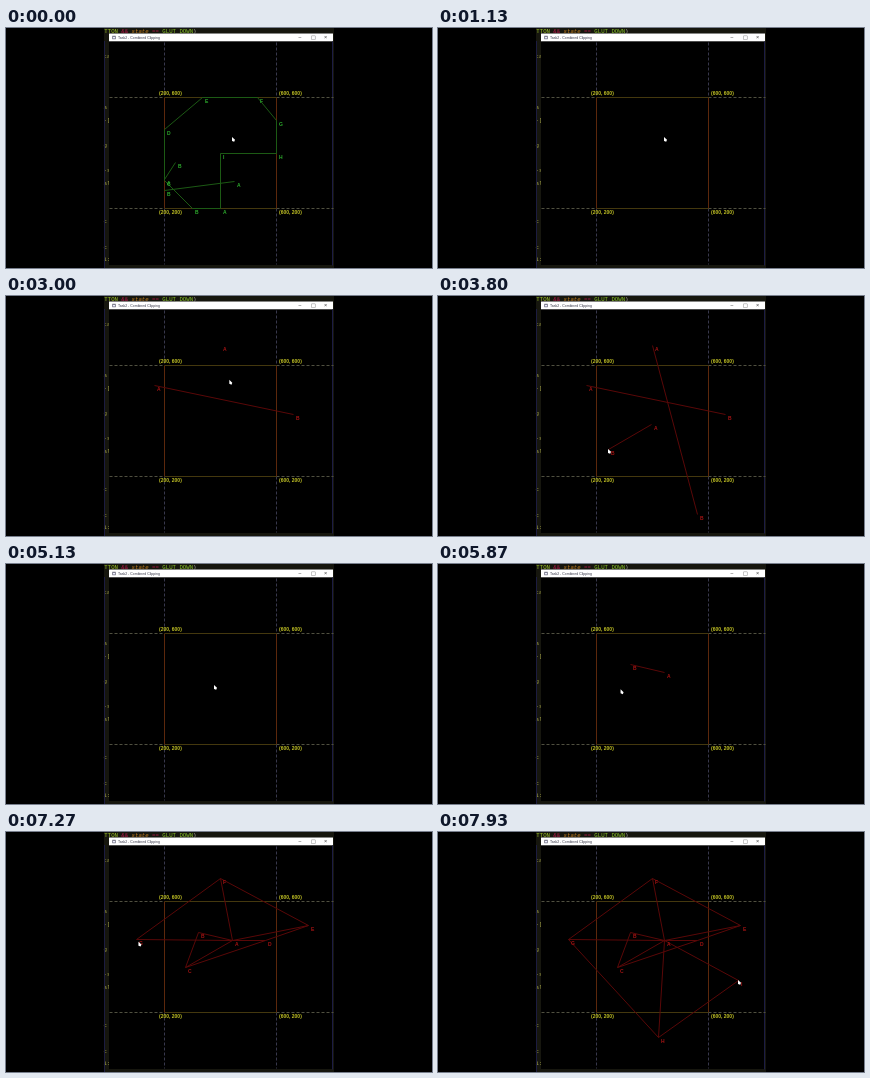
An HTML page with a canvas that plays this animation: 426x240 px, repeating every 8 s.

```html
<!DOCTYPE html>
<html lang="en">
<head>
<meta charset="utf-8">
<title>Combined clipping</title>
<style>
html, body { margin: 0; width: 100%; height: 100%; overflow: hidden; background: #000; }
canvas { display: block; width: 426px; height: 240px; }
</style>
</head>
<body>
<canvas id="stage" width="426" height="240"></canvas>
<script>
const ctx = document.getElementById('stage').getContext('2d');
const LOOP = 8000;
const SANS = '"Liberation Sans", Arial, sans-serif';
const MONO = '"Liberation Mono", monospace';
const LEFT = 158, RIGHT = 270, TOP = 69, BOTTOM = 180;
const win = { x: 103, y: 5.5, right: 327, bottom: 237, bar: 7.8 };
const red = { line: '#5a0808', text: '#a01212' };
const green = { line: '#1c5a14', text: '#2ca82c' };
const CLEAR_FIRST = 600, CLIP_LINES = 4150, CLEAR_LINES = 4700;

const clicksFrom = (start, step, points) =>
  points.map(([x, y], i) => ({ t: start + i * step, x, y }));
const toPoints = pairs => pairs.map(([x, y]) => ({ x, y }));

// Each consecutive pair of these clicks makes one line.
const lineClicks = clicksFrom(2350, 284, [
  [148, 89], [287, 118], [214, 49], [259, 218], [213, 128], [170, 153]
]);
const polygonClicks = clicksFrom(5350, 315, [
  [226, 108], [192, 100], [179, 135], [259, 108], [302, 93],
  [214, 46], [130, 107], [220, 205], [300, 148]
]);
const firstPolygon = toPoints([
  [214, BOTTOM], [186, BOTTOM], [LEFT, 152], [LEFT, 101], [196, TOP],
  [251, TOP], [RIGHT, 92], [RIGHT, 125], [214, 125]
]);
const firstLines = toPoints([[228, 153], [LEFT, 162], [LEFT, 151], [169, 134]]);
const rest = { x: 226, y: 109 }, pause = { x: 208, y: 121 };
const cursorPath = [
  { t: 0, ...rest }, { t: 1300, ...rest }, { t: 2200, x: 149, y: 78 },
  ...lineClicks, { ...lineClicks.at(-1), t: 4400 },
  { t: 4900, ...pause }, { t: 5130, ...pause },
  ...polygonClicks, { ...polygonClicks.at(-1), t: LOOP }
];

function rect(x, y, w, h, color) {
  ctx.fillStyle = color;
  ctx.fillRect(x, y, w, h);
}

function text(str, x, y, size, color, family = SANS, style = '') {
  ctx.font = `${style} ${size}px ${family}`;
  ctx.fillStyle = color;
  ctx.fillText(str, x, y);
}

function line(a, b, color, dash = []) {
  ctx.strokeStyle = color;
  ctx.lineWidth = 1;
  ctx.setLineDash(dash);
  ctx.beginPath();
  ctx.moveTo(a.x + 0.5, a.y + 0.5);
  ctx.lineTo(b.x + 0.5, b.y + 0.5);
  ctx.stroke();
}

const hLine = (y, x1, x2, color, dash) => line({ x: x1, y }, { x: x2, y }, color, dash);
const vLine = (x, y1, y2, color, dash) => line({ x, y: y1 }, { x, y: y2 }, color, dash);

function label(p, i, color) {
  text(String.fromCharCode(65 + i), p.x + 3, p.y + 5.5, 5, color, SANS, 'bold');
}

// Liang-Barsky clipping against the inner rectangle
function clip(a, b) {
  const dx = b.x - a.x, dy = b.y - a.y;
  let from = 0, to = 1;
  for (const [p, q] of [
    [-dx, a.x - LEFT], [dx, RIGHT - a.x], [-dy, a.y - TOP], [dy, BOTTOM - a.y]
  ]) {
    if (p < 0) from = Math.max(from, q / p);
    if (p > 0) to = Math.min(to, q / p);
  }
  return [from, to].map(u => ({ x: a.x + u * dx, y: a.y + u * dy }));
}

function drawEditor() {
  rect(98, 0, 230, 240, '#16160e');
  let x = 98.3;
  for (const [word, color, style] of [
    ['TTON ', '#a0c828', ''], ['&& ', '#b01848', ''], ['state ', '#c88020', 'italic'],
    ['== ', '#b01848', ''], ['GLUT_DOWN', '#88c428', ''], [')', '#b0b0a0', '']
  ]) {
    text(word, x, 4.6, 5.7, color, MONO, style);
    x += ctx.measureText(word).width;
  }
  'ta    a -[  g  -s al   c  c i:'.split(' ').length;
  'ta,,,,a,-[,,g,,-s,al,,,c,,c,i:'.split(',').forEach((word, i) =>
    text(word, 97.5, 30 + i * 12.7, 5.7, '#a8a848', MONO));
  rect(98, 13, 1, 227, '#1c1c40');
}

function drawWindow() {
  const { x, y, right, bottom, bar } = win;
  rect(x, y, right - x, bottom - y, '#000');
  rect(x, y, right - x, bar, '#fff');
  rect(106.3, 7.8, 3.4, 3.4, '#667');
  rect(107, 8.8, 2, 1.7, '#eef');
  text('Task2 - Combined Clipping', 112, 10.6, 3.5, '#334');
  text('–', 292.5, 10.8, 5, '#333');
  text('□', 305, 10.8, 5, '#333', '"DejaVu Sans", sans-serif');
  text('×', 318, 11, 5.5, '#333');
  vLine(right - 1, 13, bottom, '#1c1c44');
}

function drawGuides() {
  for (const x of [LEFT, RIGHT]) {
    vLine(x, 14, TOP, '#38384c', [3, 2]);
    vLine(x, BOTTOM, 236, '#38384c', [3, 2]);
    vLine(x, TOP, BOTTOM, '#5c280c');
  }
  for (const y of [TOP, BOTTOM]) {
    hLine(y, win.x, LEFT, '#505040', [3, 2]);
    hLine(y, RIGHT, win.right, '#505040', [3, 2]);
    hLine(y, LEFT, RIGHT, '#44380e');
    for (const x of [LEFT, RIGHT]) {
      const name = `(${x === LEFT ? 200 : 600}, ${y === TOP ? 600 : 200})`;
      text(name, x + (x === LEFT ? -5 : 3), y + (y === TOP ? -2.5 : 6.2), 5, '#c0c024', SANS, 'bold');
    }
  }
}

function drawPairs(points, colors, fit = (a, b) => [a, b]) {
  for (let i = 0; i < points.length; i += 2) {
    const [a, b] = points[i + 1] ? fit(points[i], points[i + 1]) : [points[i]];
    if (b) {
      line(a, b, colors.line);
      label(b, 1, colors.text);
    }
    label(a, 0, colors.text);
  }
}

function drawFirstResult() {
  firstPolygon.forEach((p, i) => {
    line(p, firstPolygon[(i + 1) % firstPolygon.length], green.line);
    label(p, i, green.text);
  });
  drawPairs(firstLines, green);
}

// Every new vertex adds an edge and a closing edge; older closing edges remain.
function drawPolygon(points) {
  points.forEach((p, i) => {
    if (i) line(points[i - 1], p, red.line);
    if (i > 1) line(p, points[0], red.line);
  });
  points.forEach((p, i) => label(p, i, red.text));
}

function drawCursor(t) {
  const i = cursorPath.findIndex(k => k.t > t);
  const a = cursorPath[i - 1], b = cursorPath[i];
  const u = (t - a.t) / (b.t - a.t), ease = u * u * (3 - 2 * u);
  const x = a.x + (b.x - a.x) * ease, y = a.y + (b.y - a.y) * ease;
  ctx.fillStyle = '#fff';
  ctx.beginPath();
  ctx.moveTo(x, y);
  ctx.lineTo(x, y + 4);
  ctx.lineTo(x + 2.2, y + 4.8);
  ctx.lineTo(x + 3, y + 2.8);
  ctx.fill();
}

function draw(t) {
  const made = clicks => clicks.filter(c => t >= c.t);
  rect(0, 0, 426, 240, '#000');
  drawEditor();
  drawWindow();
  drawGuides();
  if (t < CLEAR_FIRST) drawFirstResult();
  else if (t < CLIP_LINES) drawPairs(made(lineClicks), red);
  else if (t < CLEAR_LINES) drawPairs(lineClicks, green, clip);
  else drawPolygon(made(polygonClicks));
  drawCursor(t);
}

const start = performance.now();
function frame() {
  draw((performance.now() - start) % LOOP);
  requestAnimationFrame(frame);
}
frame();
</script>
</body>
</html>
```
